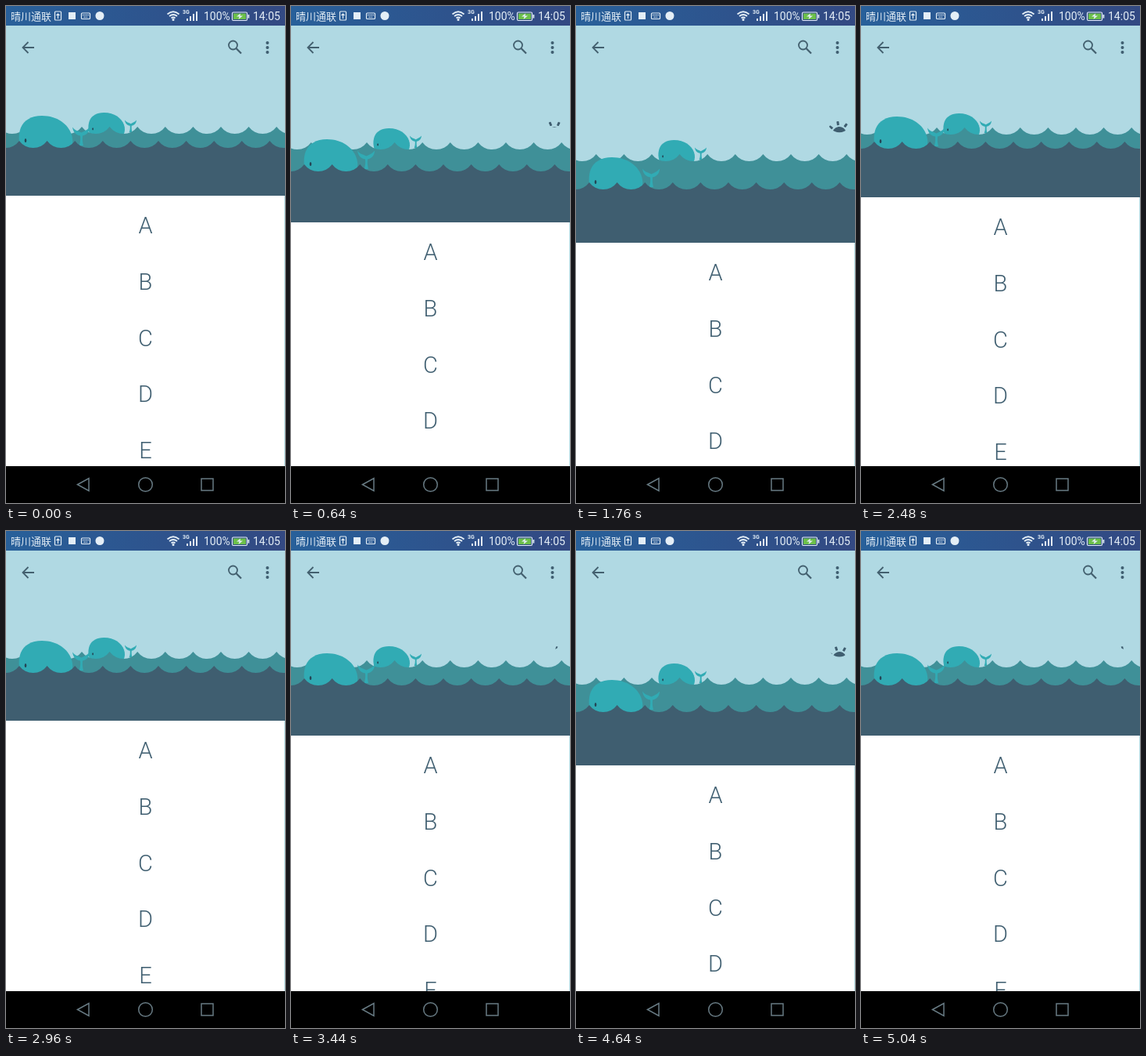
These frames come from a looping animation (357 by 634 pixels, 5120 ms). An HTML page:

```html
<!DOCTYPE html>
<html lang="zh">
<head>
<meta charset="utf-8">
<title>Pull to refresh</title>
<style>
  html, body { margin: 0; width: 100%; height: 100%; overflow: hidden; background: #000; }
  svg { display: block; width: 357px; height: 634px; }
  .status { font: 14px Roboto, sans-serif; fill: #e4eef6; }
  .carrier { font: 500 13px "Noto Sans CJK SC", "Noto Sans CJK", sans-serif; }
  .line { fill: none; stroke: #e4eef6; stroke-width: 1.2; }
  .tool { fill: none; stroke: #43606f; stroke-width: 1.8; }
  .nav { fill: none; stroke: #687b84; stroke-width: 1.5; }
  .list text { font: 300 29px Roboto, sans-serif; text-anchor: middle; }
  .deep { fill: #3f5e70; }
  .mid { fill: #3f9098; }
  .whale { fill: #31abb4; }
</style>
</head>
<body>
<svg viewBox="0 0 357 634">
  <defs>
    <linearGradient id="bar">
      <stop offset="0" stop-color="#28609a"/>
      <stop offset="1" stop-color="#334982"/>
    </linearGradient>
    <clipPath id="reveal"><circle id="iris" cx="337" cy="146" r="0"/></clipPath>
    <g id="whale">
      <path class="whale" d="M21 184C15 176 16 162 19 155C23 146 32 140 46 140C66 140 79 151 83.500 163C86 170 86 177 82 184Z"/>
      <path class="whale" d="M85 154.500C88 159 93 159.500 96.500 161.500C100 159.500 104 158.500 107 154.500C107 161 103 164.500 98 165.500C97.500 170 98 174 99 178H93.500C95 174 95.500 170 95 165.500C89 164.500 86 161 85 154.500Z"/>
      <ellipse cx="25" cy="171.500" rx="1.300" ry="2.500" fill="#244656"/>
    </g>
  </defs>

  <rect width="357" height="634" fill="#b0d9e3"/>

  <g clip-path="url(#reveal)">
    <g id="sun" class="deep"><circle cx="337" cy="163" r="9"/></g>
  </g>

  <g id="back">
    <use href="#whale" transform="translate(94.100 43.600) scale(.68 .66)"/>
    <path id="backWave" class="mid"/>
  </g>
  <g id="front">
    <use href="#whale"/>
    <path id="frontWave" class="deep"/>
  </g>

  <g id="list" class="list deep">
    <rect y="242" width="357" height="400" fill="#fff"/>
    <rect x="356" y="242" width="1" height="400" fill="#b9e2ea"/>
  </g>

  <g class="tool">
    <path d="M36 53H21.500M28.500 46L21.500 53L28.500 60"/>
    <circle cx="290.500" cy="50" r="5.500"/>
    <path d="M294.500 54L301 60.500" stroke-width="2.200"/>
  </g>
  <g class="deep">
    <circle cx="334.500" cy="47" r="2"/>
    <circle cx="334.500" cy="53" r="2"/>
    <circle cx="334.500" cy="59" r="2"/>
  </g>

  <rect width="357" height="25" fill="url(#bar)"/>
  <g class="status">
    <text class="carrier" x="6" y="18">晴川通联</text>
    <rect class="line" x="62.500" y="7" width="8" height="11" rx="1"/>
    <path class="line" d="M66.500 16V10M64.500 12L66.500 10L68.500 12"/>
    <rect x="80" y="8" width="9" height="9"/>
    <rect class="line" x="96.500" y="9" width="11" height="7.500" rx="1"/>
    <path class="line" d="M98 11.500H106M99.500 14.200H104.500" stroke-dasharray="1.500 .7"/>
    <circle cx="120" cy="12.500" r="5.500"/>
    <path class="line" style="stroke-width:1.800" d="M206.500 10.500Q214 4 221.500 10.500M209 13Q214 9 219 13M211.500 15.500Q214 13.500 216.500 15.500"/>
    <circle cx="214" cy="17.500" r="1.500"/>
    <text x="226" y="9.500" style="font-size:7px;font-weight:700">3G</text>
    <path d="M231 16h2v3h-2zM235 13h2v6h-2zM239 10h2v9h-2zM243 7h2v12h-2z"/>
    <text x="253" y="18">100%</text>
    <rect class="line" x="289.500" y="8" width="19" height="10.500" rx="1.500"/>
    <rect x="291" y="9.500" width="16" height="7.500" fill="#6cc04a"/>
    <rect x="309.500" y="11" width="1.800" height="4.500"/>
    <path d="M300 9.500L295 13.500H298.500L297.500 17L303 12.500H299.500Z"/>
    <text x="316" y="18">14:05</text>
  </g>

  <rect y="587" width="357" height="47"/>
  <g class="nav">
    <path d="M91.500 610.500L106 602.500V618.500Z"/>
    <circle cx="178.500" cy="610.500" r="8.800"/>
    <rect x="250" y="603" width="15" height="15"/>
  </g>
</svg>
<script>
  const LOOP = 5120, STEP = 80;
  const $ = id => document.getElementById(id);

  // Pull distance over time: [ms, px]
  const PULL = [
    [0, 0], [320, 0], [400, 4], [480, 10], [560, 20], [640, 34], [800, 46],
    [1200, 56], [1760, 60], [2240, 60], [2320, 33], [2400, 5], [2480, 2],
    [2720, 1], [3120, 0], [3200, 0], [3280, 4], [3360, 10], [3440, 19],
    [3520, 31], [3760, 44], [4200, 53], [4640, 57], [4920, 58], [4960, 48],
    [5040, 19], [5120, 0]
  ];

  function pullAt(t) {
    const i = PULL.findIndex(p => p[0] > t);
    const [t0, a] = PULL[i - 1], [t1, b] = PULL[i];
    return a + (b - a) * (t - t0) / (t1 - t0);
  }

  const wave = (x, y) =>
    `M${x} ${y}` + 'a22 22 0 0 0 35.6 0'.repeat(12) + 'V500H-60Z';

  function add(parent, tag, attrs, text = '') {
    const el = document.createElementNS('http://www.w3.org/2000/svg', tag);
    for (const k in attrs) el.setAttribute(k, attrs[k]);
    el.textContent = text;
    parent.append(el);
  }

  $('backWave').setAttribute('d', wave(-45.4, 154));
  $('frontWave').setAttribute('d', wave(-18.6, 172));
  [...'ABCDE'].forEach((c, i) =>
    add($('list'), 'text', { x: 178.5, y: 290.4 + i * 71.6 }, c));
  for (let a = 0; a < 360; a += 45)
    add($('sun'), 'rect', {
      x: 335.5, y: 147, width: 3, height: 5, rx: 0.6,
      transform: `rotate(${a} 337 163)`
    });

  // Layers move by whole pixels
  const shift = (id, y) =>
    $(id).setAttribute('transform', `translate(0 ${Math.floor(y)})`);

  function draw(now) {
    const t = Math.floor(now % LOOP / STEP) * STEP;
    const d = pullAt(t);
    shift('back', d * 0.59);
    shift('front', d * 0.885);
    shift('list', d);
    $('iris').setAttribute('r', d * 0.255);
    $('sun').setAttribute('transform', `rotate(${t / STEP - 30} 337 163)`);
  }

  const start = performance.now();
  function tick() {
    draw(performance.now() - start);
    requestAnimationFrame(tick);
  }
  tick();
</script>
</body>
</html>
```
